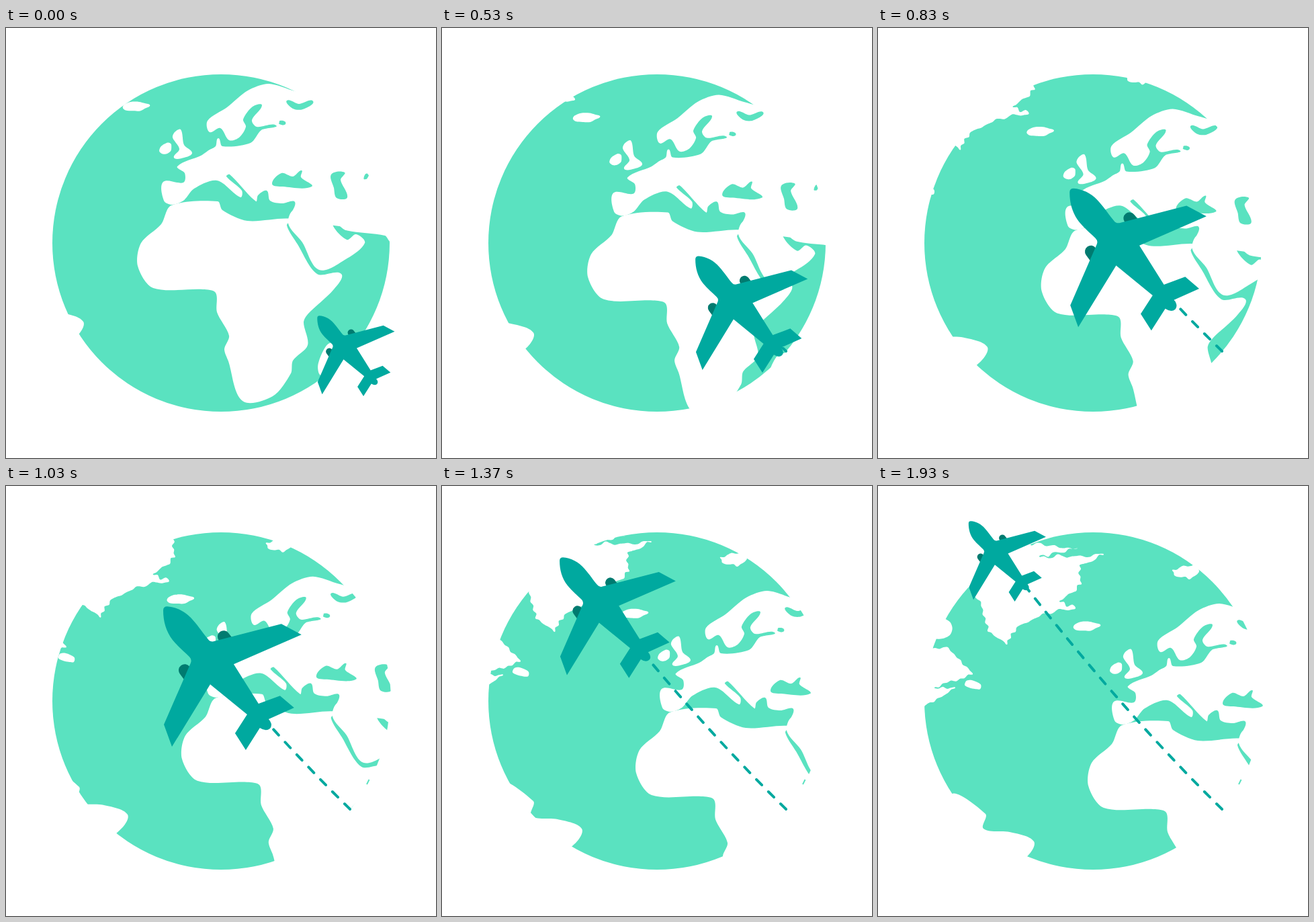
Write an HTML page that moves like this. It is 640 px wide and 640 px high and loops after 2.36 s.

```html
<!DOCTYPE html>
<html lang="en">
<head>
<meta charset="utf-8">
<title>Plane over globe</title>
<style>
  html, body { margin: 0; width: 100%; height: 100%; overflow: hidden; background: #fff; }
  svg { display: block; width: 100vw; height: 100vh; }
  .sea { fill: #5ae2c0; }
  .land { fill: #fff; }
  .body { fill: #00a99f; }
  .engine { stroke: #007b70; stroke-width: 18; stroke-linecap: round; }
  #trail { fill: none; stroke: #00a99f; stroke-width: 4; stroke-linecap: round; stroke-dasharray: 11.5 14; }
  #sliver { stroke: #5ae2c0; stroke-width: 2; }
</style>
</head>
<body>
<svg viewBox="0 0 640 640">
  <defs>
    <!-- wider than the sea, so that land leaves no rim -->
    <clipPath id="disc"><circle cx="320" cy="320" r="253"/></clipPath>
    <clipPath id="flown"><rect id="flownBox" width="640" height="640"/></clipPath>
  </defs>
  <circle class="sea" cx="320" cy="320" r="251"/>
  <g clip-path="url(#disc)">
    <g id="map">
      <g id="east"></g>
      <g id="west" transform="translate(-117 -92)"></g>
    </g>
  </g>
  <path id="sliver" d="M537 444L540.5 437"/>
  <g clip-path="url(#flown)"><path id="trail" d="M512 481Q372 344 220 150"/></g>
  <!-- drawn around the midpoint between the wing tips -->
  <g id="plane">
    <g transform="translate(-343.5 -303.5)">
      <path class="engine" d="M324 223L334 236M266 273L277 288"/>
      <path class="body" d="M234 184Q234 178 240 178C254 179 268 186 278 198C287 208 294 219 301 227Q304 231 309 230
        L410 204L440 220L339 264L376 323L408 311L429 329L391 346Q398 354 393 360Q387 365 378 359L357 392L341 367L359 339
        L304 294L247 387L235 354L275 262Q277 257 273 253C266 246 256 238 248 228C238 215 234 200 234 184Z"/>
    </g>
  </g>
</svg>
<script>
const $ = id => document.getElementById(id);

let seed = 7;
const jitter = size => {
  seed = seed * 16807 % 2147483647;
  return (seed / 2147483647 * 2 - 1) * size;
};

// Closed smooth path; handles follow the neighbours, as long as the segment allows
function smooth(p) {
  const at = i => p[(i + p.length) % p.length];
  const handle = (i, length) => {
    const [x0, y0] = at(i - 1), [x1, y1] = at(i + 1);
    const k = length / (Math.hypot(x1 - x0, y1 - y0) || 1);
    return [at(i)[0] + (x1 - x0) * k, at(i)[1] + (y1 - y0) * k];
  };
  return 'M' + p[0] + p.map((a, i) => {
    const b = at(i + 1), reach = 0.28 * Math.hypot(b[0] - a[0], b[1] - a[1]);
    return 'C' + [handle(i, reach), handle(i + 1, -reach), b].join(' ');
  }).join('') + 'Z';
}

// Outline through key points; a rough coast gets random inlets between them
function coast(text, rough = 0) {
  const keys = text.trim().split(/\s+/).map(s => s.split(',').map(Number));
  if (!rough) return smooth(keys);
  return smooth(keys.flatMap(([x, y], i) => {
    const [u, v] = keys[(i + 1) % keys.length];
    const length = Math.hypot(u - x, v - y), n = Math.ceil(length / 7);
    return Array.from({ length: n }, (_, k) => {
      const side = k ? jitter(rough) / length : 0;
      return [x + (u - x) * k / n - (v - y) * side, y + (v - y) * k / n + (u - x) * side];
    });
  }));
}

// Small uneven island or lake
function blob(cx, cy, rx, ry, degrees = 0) {
  const turn = degrees * Math.PI / 180, c = Math.cos(turn), s = Math.sin(turn);
  return smooth(Array.from({ length: 10 }, (_, i) => {
    const a = i * Math.PI / 5, r = 1 + jitter(0.15);
    const x = rx * r * Math.cos(a), y = ry * r * Math.sin(a);
    return [cx + x * c - y * s, cy + x * s + y * c];
  }));
}

function draw(group, kind, paths) {
  for (const d of paths) {
    const path = document.createElementNS('http://www.w3.org/2000/svg', 'path');
    path.setAttribute('class', kind);
    path.setAttribute('d', d);
    $(group).append(path);
  }
}

const africa = coast(`246,264 315,258 322,271 359,287 424,284 418,294 434,322 463,366 499,366 487,390 450,425 443,438
  449,472 427,495 424,514 397,548 352,555 331,496 325,478 332,458 314,423 312,394 293,389 219,387 196,354 201,320 231,292`);
const northEurope = coast(`460,100 430,94 391,83 360,93 329,118 300,138 303,155 319,149 332,167 347,163 357,147 353,136
  367,117 381,115 366,137 373,147 402,145 380,152 364,171 322,176 316,164 312,176 300,185 400,215 640,215 640,60`);
const southEurope = coast(`310,179 290,190 255,206 266,216 264,230 234,229 235,257 247,263 264,257 280,239 314,227 349,252
  351,242 328,221 333,218 372,258 375,249 388,242 393,257 411,261 430,259 424,284 640,290 640,192`);
const arabia = coast(`430,270 420,291 441,319 466,360 506,344 534,320 521,307 507,315 485,288 506,301 564,309 572,318
  640,330 640,270`);
const britain = coast('251,155 260,151 265,174 277,186 265,193 250,193 258,180 248,163');

const blackSea = coast('396,232 410,216 427,221 440,212 439,222 455,236 412,236');
const caspian = coast('484,218 504,215 498,226 508,252 492,253 488,238');
const whiteSea = coast('418,108 436,113 457,109 442,121 427,120');

const greenland = coast(`215,84 297,93 240,105 336,102 300,118 303,146 270,172 294,182 245,190 206,211 192,236 163,216
  153,172 110,130`, 3.5);
const labrador = coast('60,247 104,240 141,280 84,300 115,300 66,330 40,300', 2);
const southAmerica = coast('108,462 160,488 157,510 196,515 232,529 221,552 150,600');
const svalbard = coast('438,125 472,115 478,127 463,139 441,133', 3);

const ireland = blob(238, 180, 10, 7, -45);
const iceland = blob(193, 117, 19, 7, -5);
const madagascar = blob(481, 492, 13, 28, 25);
const aral = blob(536, 221, 3, 5, 30);
const ladoga = blob(411, 141, 5, 3, 10);
const baffin = blob(90, 212, 24, 18);
const newfoundland = blob(142, 296, 13, 6, 15);

draw('east', 'land', [africa, northEurope, southEurope, arabia, britain, ireland, iceland, madagascar]);
draw('east', 'sea', [blackSea, caspian, whiteSea, aral, ladoga]);
draw('west', 'land', [greenland, baffin, labrador, newfoundland, southAmerica, svalbard]);

const LOOP = 2360, STEPS = 48, STEP_MS = 40;
const ease = u => u * u * (3 - 2 * u);

function render(t) {
  const step = Math.min(STEPS, Math.round(t / STEP_MS));
  const u = step / STEPS, e = ease(u);
  const scale = (142 + 114 * ease(1 - Math.abs(2 * u - 1))) / 254;
  const x = 524.5 - 328.5 * (e - 0.08 * e * e * (1 - e));
  const y = 498.5 - 376 * (e - 0.19 * e * (1 - e));
  $('map').setAttribute('transform', `translate(${117 * e} ${92 * e})`);
  $('plane').setAttribute('transform', `translate(${x} ${y}) scale(${scale})`);
  $('flownBox').setAttribute('y', y + 51.5 * scale - 8);
  $('sliver').style.display = u > 0.53 ? '' : 'none';
}

const start = performance.now();
function tick() {
  render((performance.now() - start) % LOOP);
  requestAnimationFrame(tick);
}
tick();
</script>
</body>
</html>
```
